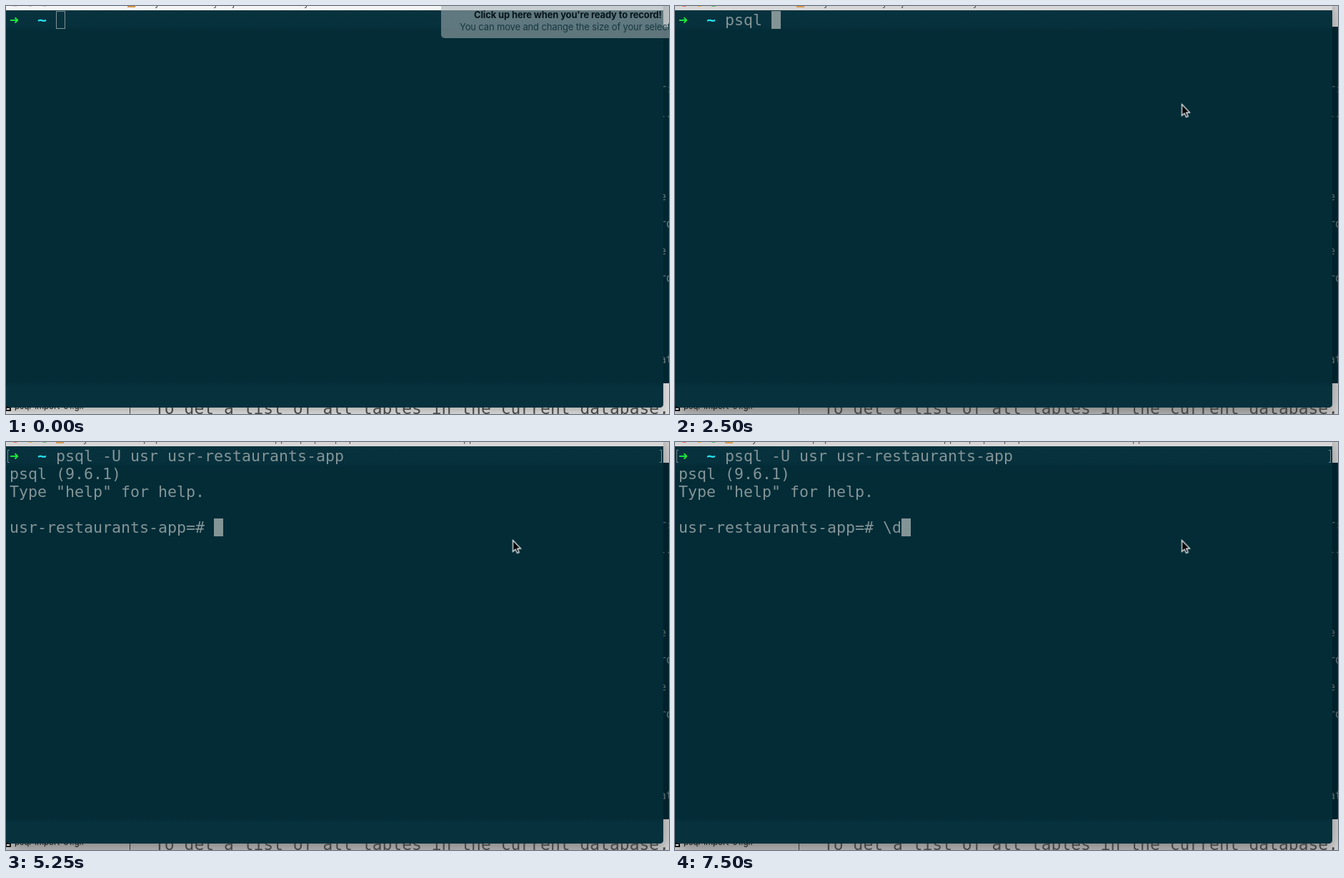
Recreate the animation shown at these times as an HTML page. Size 928 by 571 pixels, loop 8000 ms.

```html
<!DOCTYPE html>
<html lang="en">
<head>
<meta charset="utf-8">
<title>Terminal session</title>
<style>
  html, body { margin: 0; width: 100%; height: 100%; overflow: hidden; }
  body { position: relative; background: #dfdfdf; }
  div, span, svg, i { position: absolute; left: 0; top: 0; }
  span, #file, #note { white-space: pre; }
  .mono { font-family: "DejaVu Sans Mono", Menlo, monospace; }
  .ui { font-family: Inter, "Open Sans", sans-serif; }
  #stage { width: 928px; height: 571px; overflow: hidden; }

  /* page behind the terminal */
  #editor { left: 174px; top: 29px; width: 754px; height: 499px; background: #022a35; }
  #rule { left: 173px; top: 528px; width: 1px; height: 43px; background: #444; }
  #file { left: 12px; top: 552px; font-size: 11.7px; line-height: 16px; letter-spacing: -.1px; color: #111; }
  #mark { top: 556px; width: 7px; height: 11px; background: #111; }
  #mark::after { content: ""; position: absolute; left: 1px; top: 7px; width: 4px; height: 2px; background: #ddd; }
  #note { left: 208px; top: 549px; font-size: 23px; line-height: 28px; color: #474747; }
  .tail { left: 915px; font-size: 15px; line-height: 18px; color: #718488; }

  /* terminal window */
  #win {
    top: -16px; width: 920px; height: 578px; border-radius: 5px; background: #07323e;
    animation: shadow 8s step-end infinite;
  }
  #term {
    top: 7px; width: 920px; height: 555px; border-radius: 0 0 5px 5px; overflow: hidden;
    background: linear-gradient(#07323e 0, #06303c 22px, #032c37 27px, #032c37 519px, #06313d 526px, #06313d 100%);
    font-size: 21.6px; line-height: 25px; color: #839496;
  }
  #bar { width: 920px; height: 6px; overflow: hidden; animation: bar 8s step-end infinite; }
  #bar i { top: -11px; width: 12px; height: 12px; border-radius: 50%; }
  .title { font-size: 13px; line-height: 16px; color: #4a4a4a; }
  .title span { top: -13px; }
  .title b { position: absolute; top: 0; width: 11px; height: 2px; background: #d59a4c; }
  .row { left: 5px; }
  .bold { font-weight: bold; }
  #cmd { left: 70px; overflow: hidden; height: 25px; animation: type 8s step-end infinite; }
  #slash { left: 291px; top: 100px; height: 25px; overflow: hidden; animation: slash 8s step-end infinite; }
  #caret {
    width: 13px; height: 25px; box-sizing: border-box; border: 1px solid #839496;
    animation: caret 8s step-end infinite, fill 8s step-end infinite;
  }
  .edge { top: 4px; width: 2px; height: 16px; border: 1px solid #6f888e; }

  /* recorder hint */
  #hint {
    left: 609px; top: -10px; width: 340px; height: 55px; border-radius: 5px;
    background: rgba(164, 175, 178, .57); animation: only-first 8s step-end infinite;
    font-size: 13px; line-height: 17px; letter-spacing: -.15px;
  }
  #mouse { width: 14px; height: 22px; overflow: visible; animation: mouse 8s step-end infinite; }

  .early { animation: early 8s step-end infinite; }
  .late { animation: late 8s step-end infinite; }
  .off { animation: off 8s step-end infinite; }
  .on { animation: on 8s step-end infinite; }

  @keyframes shadow {
    0% { box-shadow: 0 5px 14px rgba(0, 0, 0, .22); }
    6.25%, 100% { box-shadow: 0 10px 28px rgba(0, 0, 0, .45); }
  }
  @keyframes bar { 0% { background: #f5f5f5; } 6.25%, 100% { background: #d8d7d8; } }
  @keyframes type { 0% { width: 0; } 31.25% { width: 5ch; } 34.375%, 100% { width: 31ch; } }
  @keyframes slash { 0% { width: 0; } 84.375% { width: 1ch; } 90.625%, 100% { width: 2ch; } }
  @keyframes caret {
    0% { transform: translate(70px, 0); }
    31.25% { transform: translate(135px, 0); }
    34.375% { transform: translate(473px, 0); }
    65.625% { transform: translate(291px, 100px); }
    84.375% { transform: translate(304px, 100px); }
    90.625%, 100% { transform: translate(317px, 100px); }
  }
  @keyframes fill { 0% { background: transparent; } 6.25%, 100% { background: #839496; } }
  @keyframes only-first { 0% { visibility: visible; } 3.125%, 100% { visibility: hidden; } }
  @keyframes mouse {
    0% { visibility: hidden; transform: translate(712.5px, 136.5px); }
    3.125% { visibility: visible; transform: translate(712.5px, 136.5px); }
    6.25%, 100% { visibility: visible; transform: translate(709.5px, 137.5px); }
  }
  @keyframes early { 0% { visibility: visible; } 65.625%, 100% { visibility: hidden; } }
  @keyframes late { 0% { visibility: hidden; } 65.625%, 100% { visibility: visible; } }
  @keyframes off { 0% { visibility: visible; } 6.25%, 100% { visibility: hidden; } }
  @keyframes on { 0% { visibility: hidden; } 6.25%, 100% { visibility: visible; } }
</style>
</head>
<body>
<div id="stage">
  <div id="editor"></div>
  <div id="rule"></div>
  <div class="mono">
    <span class="tail" style="top:107px">r:</span>
    <span class="tail" style="top:145px">--</span>
    <span class="tail" style="top:258px">e</span>
    <span class="tail" style="top:296px">ro</span>
    <span class="tail" style="top:334px">e</span>
    <span class="tail" style="top:372px">ro</span>
    <span class="tail" style="top:486px">at</span>
  </div>

  <div id="win"></div>
  <div id="mark"></div>
  <div id="file" class="ui">psql-import-01.gif</div>
  <div id="note" class="mono">To get a list of all tables in the current database,</div>

  <div id="bar" class="ui">
    <div class="off">
      <i style="left:7px;background:#c9c9c9"></i><i style="left:28px;background:#c9c9c9"></i><i style="left:48px;background:#c9c9c9"></i>
    </div>
    <div class="on">
      <i style="left:7px;background:#f0544d"></i><i style="left:28px;background:#eba93c"></i><i style="left:48px;background:#3fbb4c"></i>
    </div>
    <div class="title early">
      <b style="left:170px"></b>
      <span style="left:208px">y</span><span style="left:290px">y</span><span style="left:317px">j</span><span style="left:417px">y</span>
    </div>
    <div class="title late">
      <b style="left:70px"></b>
      <span style="left:108px">y</span><span style="left:192px">p</span><span style="left:209px">p</span>
      <span style="left:376px">pp</span><span style="left:411px">p</span><span style="left:431px">p</span>
      <span style="left:460px">p</span><span style="left:475px">q</span><span style="left:640px">pp</span>
    </div>
  </div>

  <div id="term" class="mono">
    <span class="row bold" style="color:#1ce83c">➜</span>
    <span class="row bold" style="left:44px;color:#22e4ee">~</span>
    <span id="cmd">psql -U usr usr-restaurants-app</span>
    <div class="late">
      <i class="edge" style="left:2px;border-right:0"></i>
      <i class="edge" style="left:915px;border-left:0"></i>
      <span class="row" style="top:25px">psql (9.6.1)</span>
      <span class="row" style="top:50px">Type "help" for help.</span>
      <span class="row" style="top:100px">usr-restaurants-app=#</span>
    </div>
    <span id="slash">\d</span>
    <div id="caret"></div>
  </div>

  <div id="hint" class="ui">
    <span class="bold" style="left:46px;top:14px;color:#06161b">Click up here when you're ready to record!</span>
    <span style="left:26px;top:31px;color:#173840">You can move and change the size of your selection.</span>
  </div>
  <svg id="mouse" viewBox="0 0 14 22">
    <path d="M0 0V16L3.6 12.7L6.1 18L8.7 16.9L6.3 11.6H11Z" fill="#000" stroke="#fff" stroke-width="1.2"/>
  </svg>
</div>
</body>
</html>
```
